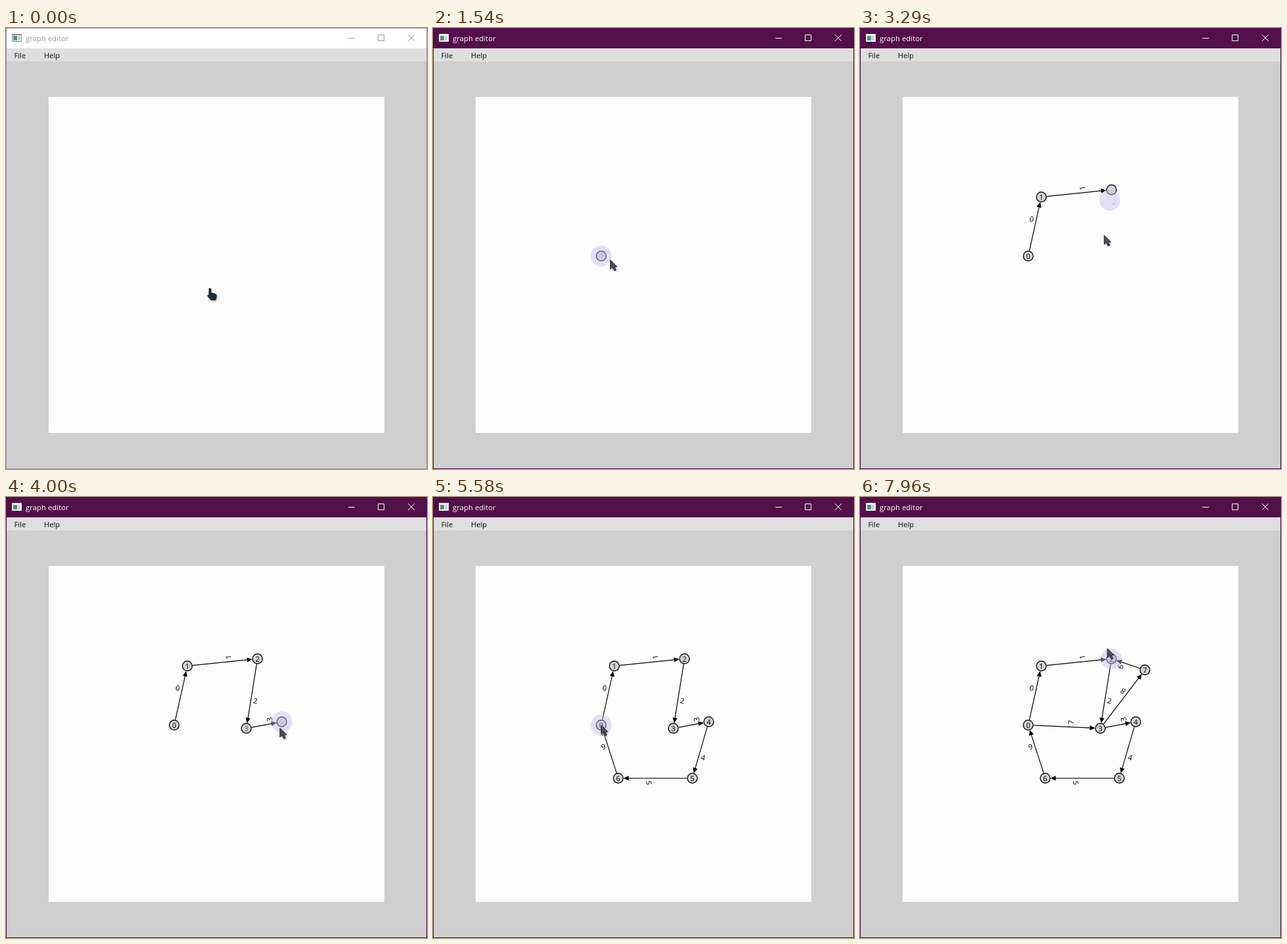
An HTML page with a canvas for the animation above (8000 ms loop, 642x672 px).

```html
<!DOCTYPE html>
<html lang="en">
<head>
<meta charset="utf-8">
<title>graph editor</title>
<style>
html, body { margin: 0; width: 642px; height: 672px; overflow: hidden; }
canvas { display: block; }
</style>
</head>
<body>
<canvas id="stage" width="642" height="672"></canvas>
<script>
const ctx = document.getElementById('stage').getContext('2d');
const LOOP = 8000, ACTIVATE = 420, LAG = 90;
const FONT = '"Open Sans", "Noto Sans", sans-serif';
const TITLE = '#520f49';

const nodes = [
  [256, 347], [276, 257], [383, 246], [366, 352],
  [420, 342], [395, 428], [282, 428], [434, 263]
].map(([x, y]) => ({ x, y, born: Infinity }));
nodes[0].born = 1440;

// The graph is drawn in one walk; each drag takes half the time until the next one
const walk = [0, 1, 2, 3, 4, 5, 6, 0, 3, 7, 2];
const departures = [1950, 2750, 3140, 3640, 3970, 4270, 4760, 5760, 6370, 7000, 7660];
const edges = walk.slice(1).map((to, i) => {
  const start = departures[i], stop = (start + departures[i + 1]) / 2;
  const node = nodes[to];
  node.born = Math.min(node.born, stop + LAG + 60);
  return { from: nodes[walk[i]], to: node, start, stop };
});

// Pointer moves: start, stop, x, y
const moves = [
  [300, 850, 448, 378], [1040, 1360, 256, 347], [1455, 1540, 270, 353], [1700, 1830, 256, 347],
  ...edges.map(e => [e.start, e.stop, e.to.x, e.to.y]),
  [7870, 8000, 375, 226]
];

const clamp = v => Math.max(0, Math.min(1, v));
const smooth = v => v * v * (3 - 2 * v);

function pointer(t) {
  let x = 309, y = 396;
  for (const [start, stop, toX, toY] of moves) {
    const k = smooth(clamp((t - start) / (stop - start)));
    x += (toX - x) * k;
    y += (toY - y) * k;
  }
  return [x, y];
}

function rect(color, x, y, w, h) {
  ctx.fillStyle = color;
  ctx.fillRect(x, y, w, h);
}

function disc(color, x, y, r) {
  ctx.fillStyle = color;
  ctx.beginPath();
  ctx.arc(x, y, r, 0, Math.PI * 2);
  ctx.fill();
}

function text(str, x, y, size, color, align = 'left') {
  ctx.font = `500 ${size}px ${FONT}`;
  ctx.textAlign = align;
  ctx.fillStyle = color;
  ctx.fillText(str, x, y);
}

function drawWindow(active) {
  const ink = active ? '#fff' : '#999';
  rect('#cfcfcf', 0, 0, 642, 672);
  rect(active ? TITLE : '#fff', 0, 0, 642, 31);
  rect('#dfdfdf', 0, 31, 642, 20);
  rect('#fdfdfd', 65, 105, 512, 512);

  // Title icon
  rect(active ? '#eee' : '#888', 9, 9, 15, 12);
  rect('#f8f8f8', 10, 11, 13, 9);
  rect('#4f8f80', 11, 12, 6, 7);
  rect('#c4d4d0', 18, 12, 4, 7);

  text('graph editor', 30, 20, 11.4, ink);
  text('File', 12.5, 46, 11.2, '#111');
  text('Help', 58, 46, 11.2, '#111');

  ctx.strokeStyle = ink;
  ctx.lineWidth = 1;
  ctx.beginPath();
  ctx.moveTo(522, 15.5);
  ctx.lineTo(532, 15.5);
  ctx.rect(567.5, 10.5, 9, 9);
  ctx.moveTo(613, 10);
  ctx.lineTo(623, 20);
  ctx.moveTo(623, 10);
  ctx.lineTo(613, 20);
  ctx.stroke();

  ctx.strokeStyle = active ? TITLE : '#999';
  ctx.strokeRect(0.5, 0.5, 641, 671);
}

// Drawn in a frame whose x axis runs along the edge
function drawEdge({ from, start, stop }, label, t) {
  const alpha = clamp((t - start - LAG) / 200);
  if (!alpha) return;
  const [x, y] = pointer(Math.min(t - LAG, stop));
  const dx = x - from.x, dy = y - from.y, len = Math.hypot(dx, dy);
  ctx.save();
  ctx.globalAlpha = alpha;
  ctx.translate(from.x, from.y);
  ctx.rotate(Math.atan2(dy, dx));
  if (len > 17) {
    const tip = len - 8;
    ctx.strokeStyle = ctx.fillStyle = '#000';
    ctx.lineWidth = 1.2;
    ctx.beginPath();
    ctx.moveTo(8, 0);
    ctx.lineTo(tip - 1, 0);
    ctx.stroke();
    ctx.beginPath();
    ctx.moveTo(tip, 0);
    ctx.lineTo(tip - 8, -3.7);
    ctx.lineTo(tip - 8, 3.7);
    ctx.fill();
  }
  ctx.translate(len / 2 + 10, -7);
  ctx.rotate(-Math.PI / 2);
  text(label, 0, 4, 11.3, '#000', 'center');
  ctx.restore();
}

function drawNode({ x, y, born }, label, t) {
  if (t < born) return;
  disc('#111', x, y, 8.2);
  disc('#d3d3d3', x, y, 6.8);
  ctx.globalAlpha = clamp((t - born - 200) / 450);
  text(label, x, y + 4, 11.3, '#000', 'center');
  ctx.globalAlpha = 1;
}

const arrow = new Path2D('M0 0V14L3.4 11L6 16.5L8.5 15.3L6 10.2H10Z');
const hand = new Path2D('M0 1Q1.5-1 3 1V7L9 8.5Q12 9 11.5 12L10 18H3L-2 12Q-2.5 9.5 0 11Z');

function drawCursor(shape, fill, x, y) {
  ctx.save();
  ctx.translate(x, y);
  ctx.shadowColor = '#b4b4c4';
  ctx.shadowBlur = 3;
  ctx.shadowOffsetX = ctx.shadowOffsetY = 2;
  ctx.fillStyle = fill;
  ctx.fill(shape);
  ctx.shadowColor = 'transparent';
  ctx.strokeStyle = '#22262f';
  ctx.lineWidth = 1;
  ctx.stroke(shape);
  ctx.restore();
}

function draw(now) {
  const t = now % LOOP, active = t >= ACTIVATE;
  drawWindow(active);
  ctx.save();
  ctx.translate(0.5, 0.5);
  edges.forEach((e, i) => drawEdge(e, i, t));
  nodes.forEach((n, i) => drawNode(n, i, t));
  if (active) {
    disc('rgba(190,188,240,0.45)', ...pointer(t - LAG), 16);
    drawCursor(arrow, '#4c505c', ...pointer(t));
  } else {
    drawCursor(hand, '#1f2d3c', ...pointer(t));
  }
  ctx.restore();
  requestAnimationFrame(draw);
}
requestAnimationFrame(draw);
</script>
</body>
</html>
```
